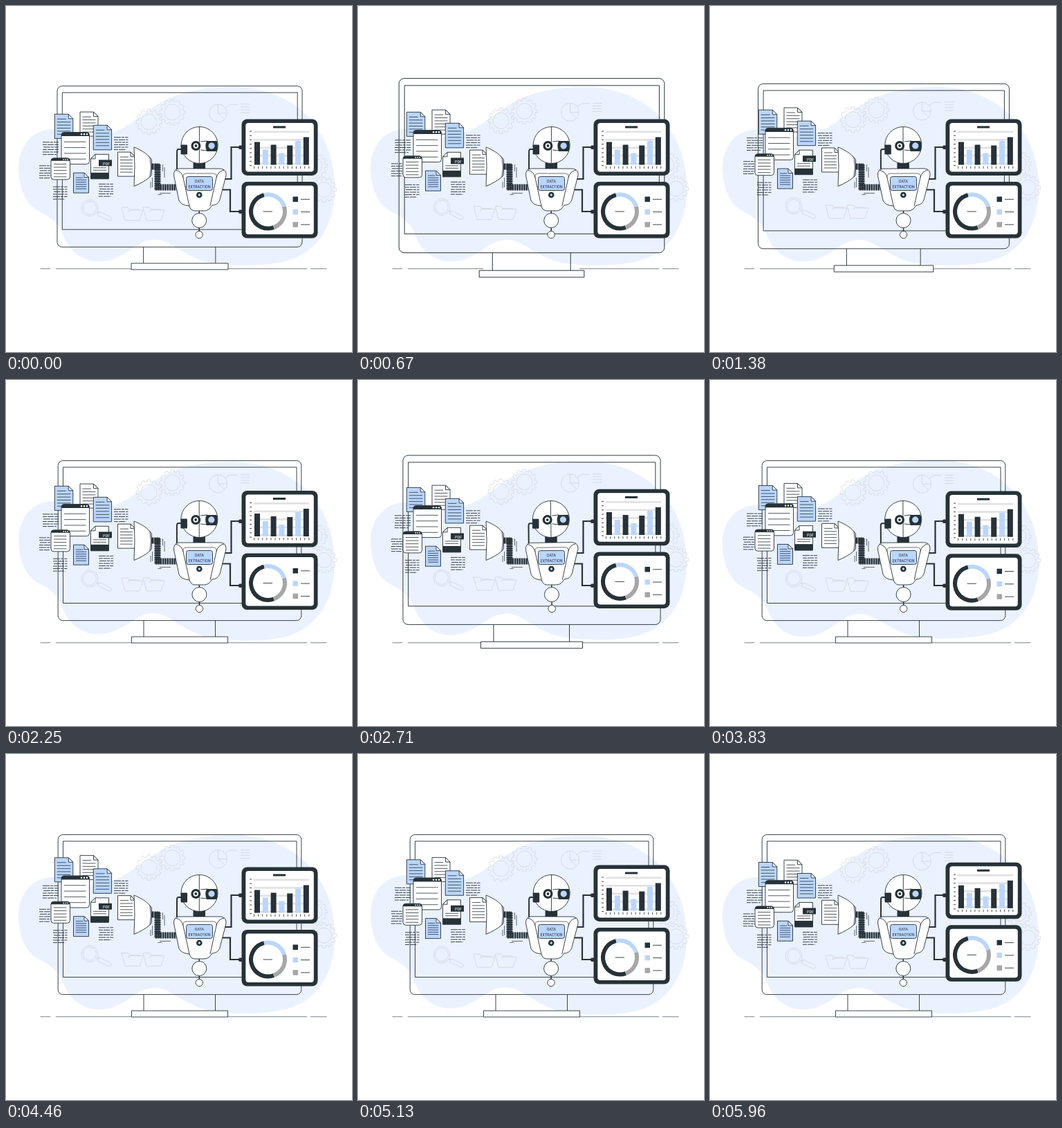
Write an HTML page with a canvas that moves like this. It is 500 by 500 pixels and loops after 6 s.

```html
<!DOCTYPE html>
<html lang="en">
<head>
<meta charset="utf-8">
<title>Data extraction</title>
<style>
html, body { margin: 0; width: 100%; height: 100%; overflow: hidden; background: #fff; }
canvas { display: block; width: 500px; height: 500px; }
</style>
</head>
<body>
<canvas id="stage"></canvas>
<script>
const cv = document.getElementById('stage');
const dpr = window.devicePixelRatio || 1;
cv.width = cv.height = 500 * dpr;
const c = cv.getContext('2d');

const INK = '#263238', BLUE = '#bad6ff', PALE = '#ebf2ff', GRAY = '#a6a6a6', FAINT = '#d3d8df', WHITE = '#fff';
const NARROW = '"Roboto Condensed", "Noto Sans", "Open Sans", sans-serif';
const LOOP = 6000, FPS = 24, TAU = Math.PI * 2;

function paint(fill, stroke, w = 0.9) {
  if (fill) { c.fillStyle = fill; c.fill(); }
  if (stroke) { c.strokeStyle = stroke; c.lineWidth = w; c.stroke(); }
}
function shape(d, fill, stroke, w = 0.9) {
  const p = new Path2D(d);
  if (fill) { c.fillStyle = fill; c.fill(p); }
  if (stroke) { c.strokeStyle = stroke; c.lineWidth = w; c.stroke(p); }
}
function box(x, y, w, h, r, fill, stroke, lw) {
  c.beginPath();
  c.roundRect(x, y, w, h, r);
  paint(fill, stroke, lw);
}
function disc(x, y, r, fill, stroke, lw) {
  c.beginPath();
  c.arc(x, y, r, 0, TAU);
  paint(fill, stroke, lw);
}
function line(x1, y1, x2, y2, color = INK, w = 0.9) {
  c.beginPath();
  c.moveTo(x1, y1);
  c.lineTo(x2, y2);
  paint(null, color, w);
}
function rows(x1, x2, y, step, n, w = 0.8) {
  for (let i = 0; i < n; i++) line(x1, y + i * step, x2, y + i * step, INK, w);
}
function shifted(draw, dy) {
  c.save();
  c.translate(0, dy);
  draw();
  c.restore();
}
function turned(draw, x, y, a) {
  c.save();
  c.translate(x, y);
  c.rotate(a);
  c.translate(-x, -y);
  draw();
  c.restore();
}
// Condensed lettering; the size drops only if the widest line would overflow.
function lettering(lines, x, y, step, size, room, color) {
  c.fontStretch = 'extra-condensed';
  c.font = `${size}px ${NARROW}`;
  const widest = Math.max(...lines.map(s => c.measureText(s).width));
  c.font = `${size * Math.min(1, room / widest)}px ${NARROW}`;
  c.fillStyle = color;
  c.textAlign = 'center';
  c.textBaseline = 'alphabetic';
  lines.forEach((s, i) => c.fillText(s, x, y + i * step));
}

// Motion
function track(p, keys) {
  for (let i = 1; i < keys.length; i++) {
    const [a, u] = keys[i - 1], [b, v] = keys[i];
    if (p <= b) return u + (v - u) * (p - a) / (b - a);
  }
  return keys[keys.length - 1][1];
}
const beat = t => track(t / LOOP, [[0, 1], [.1, 1.1], [.3, 1], [.4, 1], [.5, 1.1], [.6, 1], [1, 1]]);
const rise = (t, span) => t < 0 ? 0 : track(t % span / span, [[0, 0], [.5, -6.67], [1, 0]]);
const sway = (t, span) => t < 0 ? 0 : track(t % span / span, [[0, 0], [.25, 1], [.75, -1], [1, 0]]) * Math.PI / 180;

function blob() {
  shape('M18 232C19 203 36 180 66 178C88 177 96 190 122 189C170 187 190 158 228 137C262 120 300 117 330 117' +
    'C376 118 414 134 440 164C468 196 476 234 475 270C473 322 446 358 404 369C370 377 330 376 300 372' +
    'C260 366 240 338 215 337.5C186 338 172 369 134 369.5C108 369 90 352 82 330' +
    'C76 312 62 304 46 296C26 284 18 260 18 232Z', PALE);
}

function gear(x, y, r, hub) {
  const n = 12;
  c.beginPath();
  for (let i = 0; i < n; i++) {
    const a = i * TAU / n, s = TAU / n;
    c.arc(x, y, r, a - s * .23, a + s * .23);
    c.arc(x, y, r - 3, a + s * .3, a + s * .7);
  }
  c.closePath();
  paint(null, FAINT, 0.8);
  disc(x, y, hub, null, FAINT, 0.8);
}

function icons() {
  gear(206.5, 167.5, 18.5, 11.5);
  gear(240.5, 153.5, 18.5, 11.5);
  gear(446, 231, 18, 11);
  gear(459.5, 265.5, 18, 11);
  disc(306.5, 155, 13, null, FAINT);
  shape('M306.5 142V155H319.5M306.5 155L316 164M317 147L323 142.5H334', null, FAINT);
  for (let i = 0; i < 4; i++) line(339, 142 + i * 4, 352, 142 + i * 4, FAINT);
  disc(121, 292, 12, null, FAINT);
  disc(121, 292, 9.5, null, FAINT);
  shape('M131 298L135 300M134 297L150 304.5Q154 307.5 151.5 309.5Q149 311 145 308.5L132 302Z', null, FAINT);
  for (const x of [167, 198]) {
    shape(`M${x + 5} 310L${x} 291H${x + 9}L${x + 11} 294H${x + 25}L${x + 26} 296M${x + 5} 310H${x + 26}L${x + 31} 295H${x + 11}L${x + 9} 298`, null, FAINT);
  }
}

function monitor(k) {
  c.save();
  c.translate(251, 248.3);
  c.scale(k, k);
  c.translate(-251, -248.3);
  box(75.2, 116.6, 351.6, 231, 7, null, INK);
  box(82.5, 126, 337.5, 196.5, 0, null, INK);
  line(199, 347.6, 199, 371);
  line(302.5, 347.6, 302.5, 371);
  box(181.5, 371, 139, 9, 0, WHITE, INK);
  c.restore();
}

function sheet(x, y, w, h, fill, n) {
  const f = 6.5, r = x + w;
  shape(`M${x} ${y}H${r - f}L${r} ${y + f}V${y + h}H${x}Z`, fill, INK);
  shape(`M${r - f} ${y}V${y + f}H${r}Z`, WHITE, INK);
  const step = (h - 13) / (n - 1);
  rows(x + 3.5, x + w * .62, y + 7, 0, 1);
  rows(x + 3.5, r - 3.5, y + 7 + step, step, n - 1);
}

function win(x, y, w, h, bar, lines, step) {
  box(x, y, w, h, 4, WHITE, INK);
  box(x, y, w, bar, [4, 4, 0, 0], INK);
  for (let i = 0; i < 3; i++) disc(x + w - 3.5 - i * bar * .72, y + bar / 2, bar * .22, WHITE);
  rows(x + 4, x + w - 5, y + bar + step, step, lines);
}

function scrap(x, y, w) {
  c.save();
  for (let i = 0; i < 6; i++) {
    c.setLineDash(i % 2 ? [6, 1, 9, 1.2] : [10, 1, 4, 1]);
    const y1 = y + i * 3.55;
    line(x + (i === 2 ? 1 : 0), y1, x + w - (i === 5 ? 3 : 0), y1, INK, 0.9);
  }
  c.restore();
}

function papers() {
  scrap(53, 197, 23);
  scrap(156, 190, 20.5);
  scrap(48, 231, 18);
  scrap(134, 257.5, 21);
  scrap(68, 261.5, 20.5);
  sheet(70.3, 156.5, 26.5, 35, BLUE, 6);
  sheet(107, 153.3, 26, 35, WHITE, 6);
  sheet(126.3, 172.5, 26.3, 35.5, BLUE, 6);
  win(80, 182.7, 40.5, 46, 5.5, 4, 8.3);
  win(65, 220, 27.5, 31, 4, 5, 4.6);
  sheet(97.5, 241.3, 22, 29, BLUE, 6);
  shape('M122.5 221L129 214.5H148.5V250H122.5Z', WHITE, INK);
  shape('M122.5 221H129V214.5Z', WHITE, INK);
  rows(126, 145, 234, 3.5, 2);
  box(122.5, 241, 26, 9, 0, INK);
  box(134, 222.5, 19, 9, 0, INK);
  lettering(['PDF'], 145, 229.8, 0, 7.5, 10, WHITE);
  sheet(161.5, 211.3, 25, 35, WHITE, 6);
}

function ribs(d) {
  c.save();
  c.setLineDash([2.5, 0.8]);
  shape(d, null, INK, 9);
  c.restore();
}

function hose() {
  shape('M185 204C195 208 203 213 208 219Q211 232 208 247C202 252 194 257 185 260.5Q187 232 185 204Z', WHITE, INK);
  shape('M208 219L210.5 222V244L208 247', null, INK);
  shape('M219 228V261', null, '#667078', 7);
  ribs('M211 232H222');
  ribs('M219 229V266');
  ribs('M216 262H248');
  shape('M209 254V263M211.5 248V262M226.5 229V239M229 233V248M219.5 272.5H225M222 270.5H238', null, INK, 0.7);
}

function robot() {
  shape('M254 207H249Q247 207 247 211V236', null, INK, 2);
  box(270.5, 226, 17.5, 10, 1, INK);
  disc(279.5, 201, 26.5, WHITE, INK);
  line(279.3, 174.5, 279.3, 227.5);
  line(281, 196, 291, 195);
  line(281, 208, 291, 209);
  box(252.5, 200.5, 9.5, 14, 1, INK);
  shape('M290 195H304.5Q307 201 304.5 210H290Q286.5 202 290 195Z', INK);
  disc(297, 202, 5.2, BLUE, INK, 1.2);
  disc(274.3, 202, 7, INK);
  disc(274.3, 202, 3.7, WHITE);
  disc(274.3, 202, 1.9, INK);

  line(279.3, 295, 279.3, 327, INK, 1.5);
  shape('M250 235H310Q319 236 318 245L309 280Q306 288 298 288L293 294Q290 296 286 296H273Q267 296 265 289' +
    'Q253 288 250 281L242.5 245Q242 236 250 235Z', WHITE, INK);
  shape('M245 237Q254 239 256 248L265 289M315 237Q306 239 304 248L295 289', null, INK);
  shape('M256 248Q255 242 261 242H299Q305 242 304 248', null, INK, 0.7);
  box(260.5, 246.5, 38, 20, 3, BLUE, INK);
  lettering(['DATA', 'EXTRACTION'], 279.5, 255.3, 8, 7.6, 32, INK);
  disc(279.3, 273, 4.3, INK);
  disc(279.3, 273, 1.7, BLUE);
  disc(279.3, 310, 10.5, WHITE, INK);
  disc(279.3, 330.5, 5.2, WHITE, INK);
}

function wires() {
  shape('M315 250H325.5V204H339', null, INK, 2.2);
  shape('M312 265.5H324V297H339', null, INK, 2.2);
  box(336, 201.5, 6, 5.5, 2, INK);
  box(336, 294.5, 6, 5.5, 2, INK);
}

function frame(y) {
  box(340.5, y, 110, 81.5, 8, INK);
  box(346.3, y + 5.5, 98.5, 70.5, 4, WHITE);
}

function panels() {
  frame(163.4);
  box(386, 173.5, 18, 3, 0, INK);
  for (let i = 0; i < 5; i++) box(358, 180.5 + i * 11.5, 80, 2.8, 0, '#e2e2e2');
  for (let i = 0; i < 9; i++) line(352, 181 + i * 6.2, 355, 181 + i * 6.2);
  for (let i = 0; i < 14; i++) line(358.5 + i * 6.1, 231.5, 358.5 + i * 6.1, 235, INK, 0.8);
  [33, 22, 29, 17, 28, 35, 40].forEach((h, i) => {
    box(359 + i * 11.8, 229.5 - h, 8, h, 0, i % 2 ? BLUE : INK);
  });

  frame(254);
  const deg = Math.PI / 180;
  [[70, 257, INK], [257, 343, BLUE], [343, 430, GRAY]].forEach(([a, b, col], i) => {
    c.beginPath();
    c.arc(378.5, 297, 24.5, a * deg, b * deg);
    paint(null, col, 6);
    const y = 275.5 + i * 18.3;
    box(414.5, y, 7.5, 7.5, 0, [INK, BLUE, GRAY][i]);
    line(426, y + 3.8, 439, y + 3.8);
  });
  line(371.5, 297, 385, 297);
}

function draw(t) {
  c.setTransform(dpr, 0, 0, dpr, 0, 0);
  c.fillStyle = WHITE;
  c.fillRect(0, 0, 500, 500);
  turned(blob, 247, 247, sway(t - 1500, 3000));
  shifted(icons, rise(t, LOOP));
  for (const [a, b] of [[49.5, 64], [72, 181], [320, 435], [440, 463.5]]) line(a, 379.7, b, 379.7, INK, 0.6);
  monitor(beat(t));
  shifted(papers, rise(t, 3000));
  hose();
  wires();
  turned(robot, 279.5, 255, sway(t, 1500));
  shifted(panels, rise(t - 1500, 3000));
}

// Stepped at 24 pictures a second, each showing the end of its step.
const start = performance.now(), last = LOOP * FPS / 1000 - 1;
function tick() {
  const t = Math.max(0, performance.now() - start) % LOOP;
  const step = Math.min(last, Math.floor(t * FPS / 1000 + 0.2));
  draw((step + 1) * 1000 / FPS);
  requestAnimationFrame(tick);
}
tick();
</script>
</body>
</html>
```
